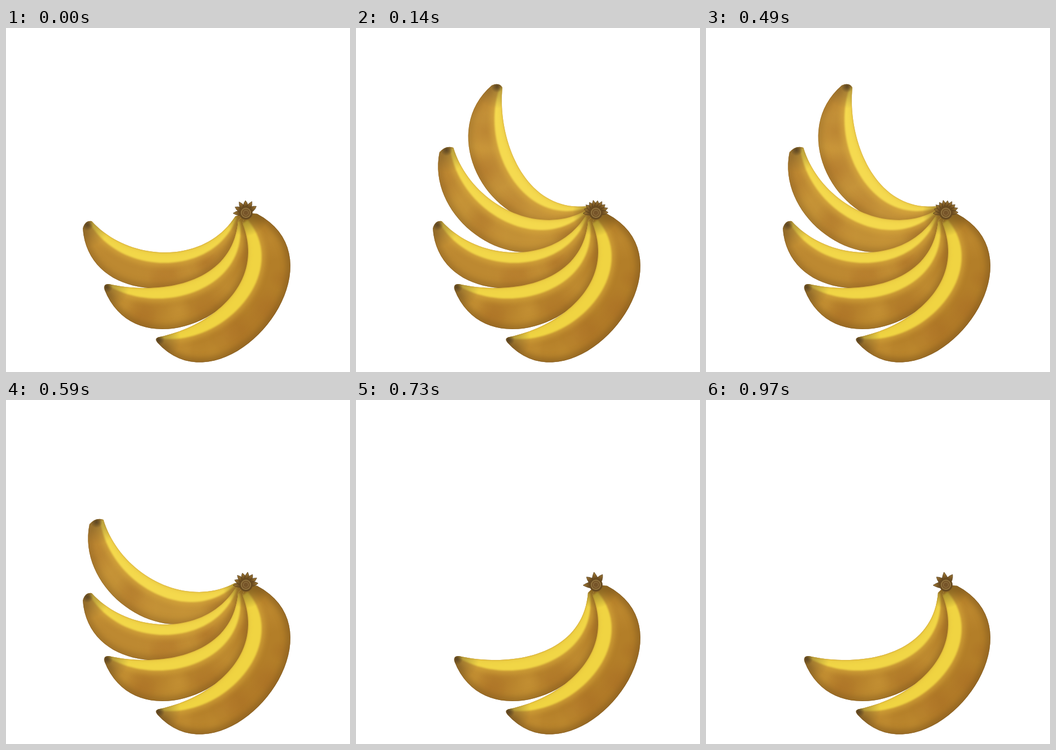
An HTML page with a canvas for the animation above (1010 ms loop, 618x618 px).

```html
<!DOCTYPE html>
<html lang="en">
<head>
<meta charset="utf-8">
<title>Bananas</title>
<style>
html, body { margin: 0; width: 100%; height: 100%; overflow: hidden; background: #fff; }
canvas { display: block; width: 100vw; height: 100vh; }
</style>
</head>
<body>
<canvas id="stage" width="618" height="618"></canvas>
<script>
const SIZE = 618, LOOP = 1010, HUB = [431, 332], STEM = 20;
const ctx = document.getElementById('stage').getContext('2d');

// start time in ms, number of bananas
const steps = [[0, 3], [60, 4], [140, 5], [240, 6], [490, 5], [590, 4], [670, 3], [730, 2], [770, 1], [970, 2]];

// Front to back: each edge at its tip, one third and two thirds of the way to the hub.
const bananas = [
  { inner: [[276, 555], [366, 517], [426, 447]], outer: [[272, 565], [409, 584], [506, 463]] },
  { inner: [[185, 460], [284, 465], [373, 431]], outer: [[177, 470], [284, 541], [406, 483]] },
  { inner: [[154, 347], [238, 397], [335, 396]], outer: [[138, 360], [213, 458], [343, 451]] },
  { inner: [[175, 215], [229, 298], [316, 342]], outer: [[150, 223], [187, 346], [301, 403]] },
  { inner: [[263, 107], [273, 205], [323, 290]], outer: [[244, 103], [205, 226], [281, 332]] },
  { inner: [[414, 35], [367, 127], [365, 228]], outer: [[398, 22], [299, 118], [292, 256]] }
];

const mix = (a, b, f) => a.map((v, i) => v + (b[i] - v) * f);
const rgba = (rgb, alpha = 1) => `rgba(${rgb.map(Math.round)},${alpha})`;

function polar(degrees, r) {
  const a = degrees * Math.PI / 180;
  return [HUB[0] + r * Math.cos(a), HUB[1] + r * Math.sin(a)];
}

function seeded(seed) {
  return () => {
    seed = (seed * 16807) % 2147483647;
    return seed / 2147483647;
  };
}

// The cubic through four points at t = 0, 1/3, 2/3 and 1.
function cubic([a, b, c, d]) {
  return t => {
    const u = 3 * t;
    const wa = (1 - u) * (2 - u) * (3 - u) / 6, wb = u * (2 - u) * (3 - u) / 2;
    const wc = u * (u - 1) * (3 - u) / 2, wd = u * (u - 1) * (u - 2) / 6;
    return a.map((v, i) => v * wa + b[i] * wb + c[i] * wc + d[i] * wd);
  };
}

const sample = edge => Array.from({ length: 41 }, (_, i) => edge(i / 40));

function line(pts) {
  const path = new Path2D();
  pts.forEach(p => path.lineTo(...p));
  return path;
}

function glow(g, [x, y], r, rgb, alpha) {
  const fill = g.createRadialGradient(x, y, 0, x, y, r);
  fill.addColorStop(0, rgba(rgb, alpha));
  fill.addColorStop(.45, rgba(rgb, alpha * .6));
  fill.addColorStop(1, rgba(rgb, 0));
  g.fillStyle = fill;
  g.fillRect(x - r, y - r, 2 * r, 2 * r);
}

function softLine(g, path, width, blur, color) {
  g.filter = `blur(${blur}px)`;
  g.lineWidth = width;
  g.strokeStyle = color;
  g.stroke(path);
  g.filter = 'none';
}

function drawBanana(g, k) {
  // Neighbours share the point where they meet the stem.
  const angle = 108 + 27 * k;
  const inner = cubic([...bananas[k].inner, polar(angle, STEM)]);
  const outer = cubic([...bananas[k].outer, polar(k ? angle - 27 : 5, STEM)]);
  const across = (t, f) => mix(inner(t), outer(t), f);
  const ridge = t => across(t, .23 + .13 * t);
  const innerPts = sample(inner), outerPts = sample(outer), ridgePts = sample(ridge);

  const tip = across(0, .5), behind = across(.08, .5);
  const reach = 9 / Math.hypot(tip[0] - behind[0], tip[1] - behind[1]);
  const cap = mix(tip, behind, -reach);
  const shape = line([...outerPts, HUB, ...innerPts.reverse()]);
  shape.quadraticCurveTo(...cap, ...outerPts[0]);

  const age = k / 5, shade = .5 - .25 * age;
  const innerLine = line(innerPts), outerLine = line(outerPts);
  g.save();
  g.fillStyle = rgba(mix([179, 126, 40], [203, 154, 62], age));
  g.fill(shape);
  g.clip(shape);

  const random = seeded(71 + 37 * k);
  for (let i = 0; i < 10; i++) {
    const spot = across(.08 + .8 * random(), .5 + .4 * random());
    const tone = i % 2 ? [166, 104, 36] : [208, 156, 58];
    glow(g, spot, 20 + 25 * random(), tone, .3);
  }
  softLine(g, outerLine, 13, 6, rgba([112, 76, 26], shade));
  softLine(g, line(ridgePts), 12, 5, rgba([220, 174, 60], .6));

  g.filter = 'blur(1.5px)';
  g.fillStyle = rgba(mix([240, 212, 66], [246, 220, 84], age));
  g.fill(line([...ridgePts, ...innerPts]));
  g.filter = 'none';
  softLine(g, innerLine, 6, 3, rgba([226, 190, 62], .55));
  softLine(g, outerLine, 1.5, .7, rgba([112, 78, 34], shade));

  glow(g, tip, 40, [98, 76, 40], .5 - .1 * age);
  glow(g, tip, 11, [72, 54, 30], .75);
  glow(g, HUB, 42, [100, 76, 26], .7);
  g.restore();
}

function drawCrown(g, count) {
  const petals = Math.min(2 * count, 10);
  const sweep = Math.min(75 + 25 * count, 180);
  const fill = g.createRadialGradient(...HUB, 9, ...HUB, 24);
  fill.addColorStop(0, '#5e421b');
  fill.addColorStop(.5, '#83602a');
  fill.addColorStop(1, '#b48c3a');
  g.fillStyle = fill;
  g.strokeStyle = 'rgba(78,54,22,.75)';
  g.lineWidth = 1;
  for (let i = 0; i < petals; i++) {
    const a = 178 + sweep * i / (petals - 1), r = 23 - i % 2;
    const half = 13 + 20 / count;
    const petal = line([polar(a - half, 13), polar(a - 9, 18), polar(a, r), polar(a + 9, 18), polar(a + half, 13), HUB]);
    petal.closePath();
    g.fill(petal);
    g.stroke(petal);
  }
  const rings = [[12, '#684a20'], [9, '#a1854c'], [7.8, '#785629'], [5, '#947744'], [4, '#765429']];
  for (const [r, color] of rings) {
    g.fillStyle = color;
    g.beginPath();
    g.arc(...HUB, r, 0, 7);
    g.fill();
  }
}

const pictures = bananas.map((_, last) => {
  const c = document.createElement('canvas');
  c.width = c.height = SIZE;
  const g = c.getContext('2d');
  for (let k = last; k >= 0; k--) drawBanana(g, k);
  drawCrown(g, last + 1);
  return c;
});

const start = performance.now();
function frame() {
  const t = (performance.now() - start) % LOOP;
  const count = steps.filter(s => s[0] <= t).pop()[1];
  ctx.fillStyle = '#fff';
  ctx.fillRect(0, 0, SIZE, SIZE);
  ctx.drawImage(pictures[count - 1], 0, 0);
  requestAnimationFrame(frame);
}
frame();
</script>
</body>
</html>
```
